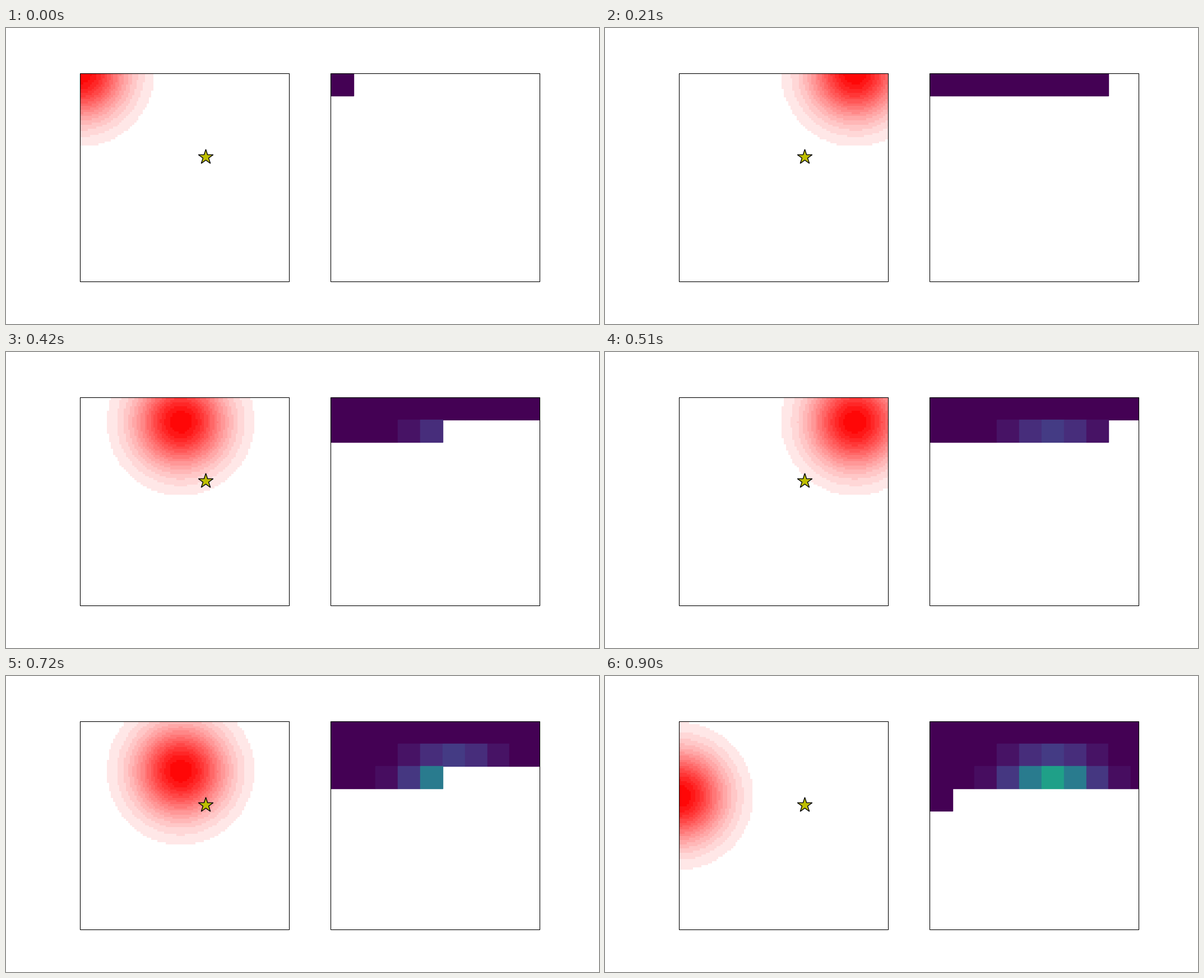
A matplotlib script for the animation above (0.93 s loop, 1058 px wide and 529 px high).

```python
import numpy as np
import matplotlib.pyplot as plt
from matplotlib.animation import FuncAnimation
from matplotlib.patches import Polygon, Rectangle

WIDTH, HEIGHT, DPI = 1058, 529, 64
PT = 72 / DPI                      # points per pixel
COLUMNS, STEPS = 10, 31
STRIDE, SIGMA = 12, 15             # in field units, the field is 100 wide
SOURCE = (60, 40)
LEFT, TOP, UNIT = 132.3, 80.8, 3.7285
MAP_LEFT, MAP_TOP, PITCH = 579.75, 81.2, 39.83

fig = plt.figure(figsize=(WIDTH / DPI, HEIGHT / DPI), dpi=DPI, facecolor="white")
ax = fig.add_axes([0, 0, 1, 1])


def gaussian(dx, dy):
    return np.exp(-(dx**2 + dy**2) / (2 * SIGMA**2))


def center(step):
    return STRIDE * (step % COLUMNS), STRIDE * (step // COLUMNS)


def panel(left, right, top=81.5, bottom=453.5):
    frame = Rectangle((left, top), right - left, bottom - top, fill=False,
                      ec="black", lw=1.11 * PT, snap=False, zorder=5)
    return ax.add_patch(frame)


def blob(step):
    """Red spot on white, shaded in sixteen flat bands."""
    cx, cy = center(step)
    level = np.floor(16 * gaussian(axis[None, :] - cx, axis[:, None] - cy))
    strength = np.where(level < 1, 0, np.minimum(level + 0.5, 15.5) / 16)
    return np.dstack([np.ones_like(strength), 1 - strength, 1 - strength])


def make_cell(step):
    cx, cy = center(step)
    value = gaussian(cx - SOURCE[0], cy - SOURCE[1])
    color = plt.cm.viridis(value if value > 0.03 else 0.0)
    corner = (MAP_LEFT + PITCH * (step % COLUMNS), MAP_TOP + PITCH * (step // COLUMNS))
    cell = Rectangle(corner, PITCH, PITCH, fc=color, ec=color, lw=1.39 * PT,
                     zorder=2 + step / 100)
    ax.add_patch(cell)
    cell.set_clip_path(map_frame)
    return cell


def draw_star(x, y, radius):
    angles = np.arange(10) * np.pi / 5
    radii = np.where(np.arange(10) % 2, 0.381966, 1) * radius
    points = np.column_stack([x + radii * np.sin(angles), y - radii * np.cos(angles)])
    ax.add_patch(Polygon(points, fc="y", ec="black", lw=1.39 * PT,
                         joinstyle="bevel", zorder=6))


field_frame = panel(132.5, 505.5)
map_frame = panel(579.5, 952.5)

# Samples sit at the middle of their cells, so the mesh overhangs the panel.
axis = np.linspace(0, 100, 100)
half = (axis[1] - axis[0]) / 2
near, far = -half * UNIT, (100 + half) * UNIT
field = ax.imshow(blob(0), extent=(LEFT + near, LEFT + far, TOP + far, TOP + near),
                  origin="upper", interpolation="nearest", aspect="auto", zorder=1)
field.set_clip_path(field_frame)

cells = [make_cell(step) for step in range(STEPS)]
draw_star(356.5, 230.8, 13.9)

ax.set_xlim(0, WIDTH)
ax.set_ylim(HEIGHT, 0)
ax.axis("off")


def update(step):
    field.set_data(blob(step))
    for index, cell in enumerate(cells):
        cell.set_visible(index <= step)
    return [field, *cells]


anim = FuncAnimation(fig, update, frames=STEPS, interval=30, repeat=True,
                     repeat_delay=0, blit=False)
plt.show()
```
